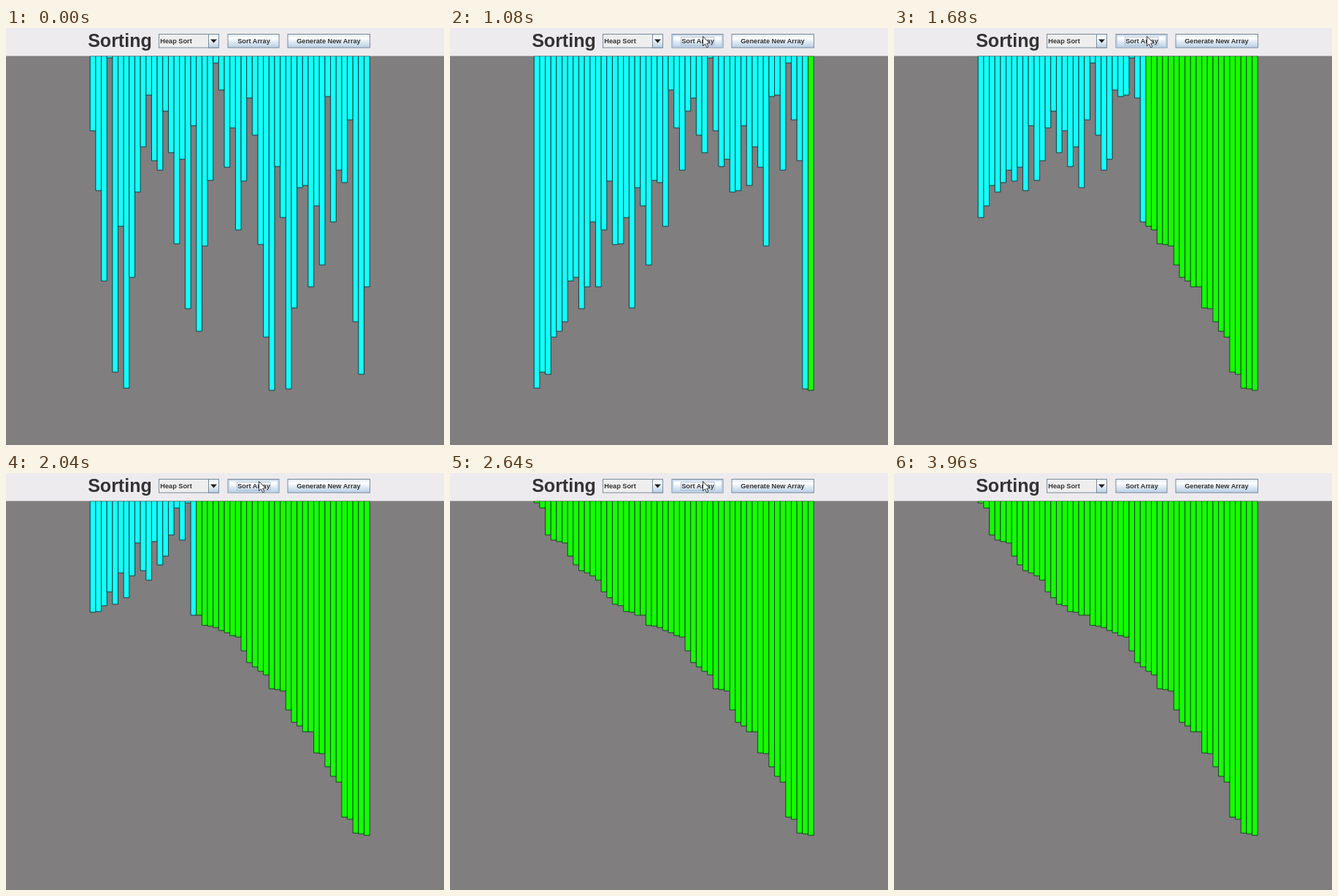
An HTML page with a canvas for the animation above (4 s loop, 600x572 px).

```html
<!DOCTYPE html>
<html lang="en">
<head>
<meta charset="utf-8">
<title>Heap sort</title>
<style>
  html, body { margin: 0; width: 600px; height: 572px; overflow: hidden; background: #807e7f; }
  canvas, svg { position: absolute; left: 0; top: 0; display: block; }
  text { font: bold 9.2px "Liberation Sans", Arial, sans-serif; fill: #333; }
  .title { font-size: 25px; }
  .box { stroke: #7a8a99; }
  .inner { fill: none; stroke: #b8cfe5; stroke-width: 1.5; }
  .focus { fill: none; stroke: #a3b8cc; stroke-width: .8; }
</style>
</head>
<body>
<canvas id="bars" width="600" height="572"></canvas>
<svg width="600" height="572" viewBox="0 0 600 572">
  <defs>
    <linearGradient id="ocean" x1="0" y1="0" x2="0" y2="1">
      <stop offset="0" stop-color="#dde8f3"/>
      <stop offset=".3" stop-color="#fff"/>
      <stop offset=".6" stop-color="#dde8f3"/>
      <stop offset="1" stop-color="#b8cfe5"/>
    </linearGradient>
  </defs>
  <rect width="600" height="38.4" fill="#edebed"/>
  <text class="title" x="112.2" y="26">Sorting</text>

  <rect class="box" x="209.5" y="8.5" width="82" height="18.5" fill="#eee"/>
  <rect class="box" x="277.5" y="8.5" width="14" height="18.5" fill="url(#ocean)"/>
  <path d="M280 15.5h9l-4.5 5z" fill="#222"/>
  <text x="211.3" y="21">Heap Sort</text>

  <rect class="box" x="304" y="8.5" width="70" height="18.5" fill="url(#ocean)"/>
  <rect class="inner" id="hover" x="305.2" y="9.7" width="67.6" height="16.1"/>
  <rect class="focus" id="focus" x="316.5" y="12.5" width="45.5" height="11"/>
  <text x="317.2" y="21">Sort Array</text>

  <rect class="box" x="386" y="8.5" width="112.5" height="18.5" fill="url(#ocean)"/>
  <text x="398.2" y="21">Generate New Array</text>

  <path id="cursor" d="M0 0V13L3 10.3L5.2 15.2L7.4 14.2L5.2 9.5H9.2Z" fill="#fff" stroke="#222" stroke-width=".9"/>
</svg>
<script>
const LOOP = 4000, TICK = 40;
const TOP = 38.4, LEFT = 115.2, PITCH = 7.66;
const BUILD_AT = 304, BUILD_STEP = 28.8, SORT_AT = 1024, SORT_STEP = 32;

// Bottom edge of every bar before sorting
const start = [
  141, 223, 347, 41, 472, 272, 494, 342, 225, 163,
  92, 182, 195, 114, 171, 296, 180, 385, 134, 416,
  299, 209, 48, 85, 191, 137, 277, 210, 96, 147,
  297, 424, 497, 190, 260, 495, 384, 219, 216, 355,
  244, 325, 94, 266, 195, 212, 126, 403, 475, 355
];
const N = start.length;

function swap(a, i, j) { [a[i], a[j]] = [a[j], a[i]]; }

function sift(a, i, size) {
  let max = i;
  for (const child of [2 * i + 1, 2 * i + 2]) {
    if (child < size && a[child] > a[max]) max = child;
  }
  if (max !== i) {
    swap(a, i, max);
    sift(a, max, size);
  }
}

// One snapshot per visible step of the sort
function record() {
  const a = start.slice(), steps = [start];
  for (let i = N / 2 - 1; i >= 0; i--) {
    sift(a, i, N);
    steps.push(a.slice());
  }
  for (let end = N - 1; end >= 0; end--) {
    swap(a, 0, end);
    sift(a, 0, end);
    steps.push(a.slice());
  }
  return steps;
}

const steps = record();
const ctx = document.getElementById('bars').getContext('2d');
const [hover, focus, cursor] = ['hover', 'focus', 'cursor'].map(id => document.getElementById(id));
const clamp = (v, lo, hi) => Math.min(hi, Math.max(lo, v));
const show = (el, on) => { el.style.display = on ? '' : 'none'; };

function drawBars(t) {
  const built = clamp(Math.floor((t - BUILD_AT) / BUILD_STEP) + 1, 0, N / 2);
  const sorted = Math.floor((t - SORT_AT) / SORT_STEP);
  const step = sorted < 0 ? built : Math.min(N / 2 + sorted + 1, steps.length - 1);
  ctx.fillStyle = '#807e7f';
  ctx.fillRect(0, 0, 600, 572);
  ctx.strokeStyle = '#0c1c1c';
  ctx.lineWidth = .8;
  steps[step].forEach((bottom, i) => {
    ctx.fillStyle = i >= N - sorted ? '#14ff00' : '#14ffff';
    ctx.beginPath();
    ctx.rect(LEFT + i * PITCH, TOP, PITCH, bottom - TOP);
    ctx.fill();
    ctx.stroke();
  });
}

function drawPointer(t) {
  const enter = 1 - (1 - clamp((t - 40) / 200, 0, 1)) ** 2;
  const leave = clamp((t - 2840) / 280, 0, 1) ** 2;
  const x = 5 + 341.5 * enter + 113.5 * leave;
  const y = 150 - 138.5 * enter + 270 * leave;
  cursor.setAttribute('transform', `translate(${x} ${y})`);
  show(cursor, t >= 40 && t < 3320);
  show(hover, t >= 200 && t < 2920);
  show(focus, t >= 280 && t < 3440);
}

function frame() {
  const t = Math.floor(performance.now() % LOOP / TICK) * TICK;
  drawBars(t);
  drawPointer(t);
  requestAnimationFrame(frame);
}
frame();
</script>
</body>
</html>
```
